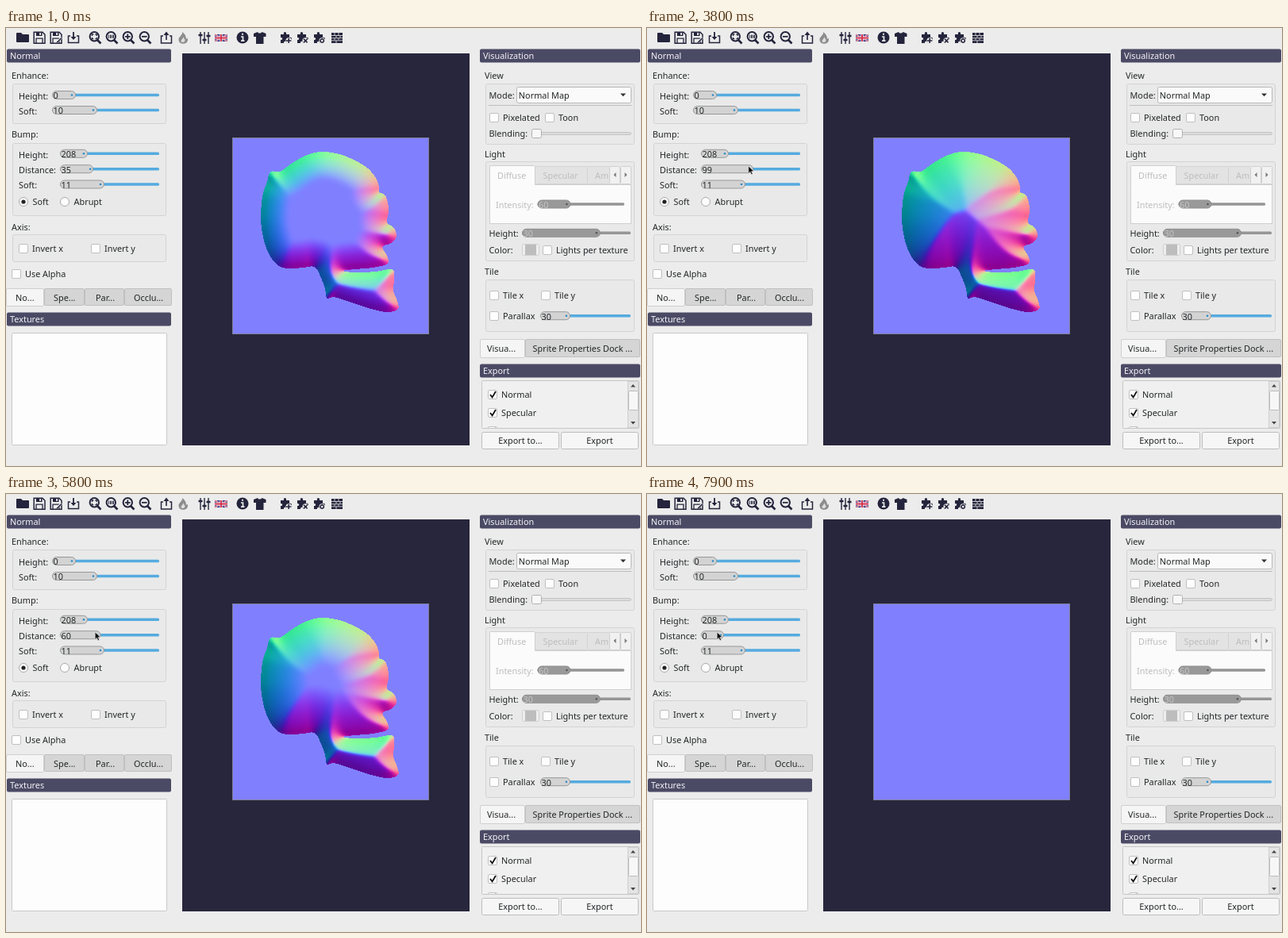
An HTML page with a canvas for the animation above (8000 ms loop, 800 by 552 pixels).

```html
<!DOCTYPE html>
<html lang="en">
<head>
<meta charset="utf-8">
<title>Normal map editor</title>
<style>
  html, body { margin: 0; width: 800px; height: 552px; overflow: hidden; background: #ececec; }
  svg, canvas { position: absolute; left: 0; top: 0; display: block; }
  canvas { left: 285px; top: 138px; }
  text { font: 10.88px "Noto Sans", "Open Sans", sans-serif; white-space: pre; }
</style>
</head>
<body>
<svg id="ui" width="800" height="552"></svg>
<canvas id="map" width="248" height="248"></canvas>
<svg id="top" width="800" height="552"></svg>
<script>
const start = performance.now();
const NS = "http://www.w3.org/2000/svg";
const ui = document.getElementById("ui");
const INK = "#232627", DARK = "#24243c", BLUE = "#55abdf", EDGE = "#c4c4c4", BAR = "#4b4a65";

function add(tag, attrs, parent = ui) {
  const el = document.createElementNS(NS, tag);
  for (const k in attrs) el.setAttribute(k, attrs[k]);
  return parent.appendChild(el);
}
function box(x, y, w, h, fill, stroke = "none", rx = 0, parent = ui) {
  const o = stroke === "none" ? 0 : 0.5;
  return add("rect", { x: x + o, y: y + o, width: w - 2 * o, height: h - 2 * o, rx, fill, stroke }, parent);
}
function label(x, y, s, fill = INK, anchor = "start", parent = ui) {
  const el = add("text", { x, y, fill, "text-anchor": anchor }, parent);
  el.textContent = s;
  return el;
}
const path = (d, fill = DARK, extra = {}, parent = ui) => add("path", { d, fill, ...extra }, parent);
const group = (x, y, w, h) => box(x, y, w, h, "#e9e9e9", "#d3d3d3", 2);
const tick = (x, y, parent) => path(`M${x + 3} ${y + 6}l2.6 3.4L${x + 10} ${y + 2}`, "none",
  { stroke: "#111", "stroke-width": 1.8 }, parent);

function header(x, y, w, s) {
  box(x, y - 0.5, w, 17, BAR, "none", 2);
  label(x + 4, y + 12, s, "#f4f4f8");
}
function check(x, y, s, on, parent = ui) {
  box(x, y, 12, 12, "#fdfdfd", "#c0c0c0", 1.5, parent);
  if (on) tick(x, y, parent);
  if (s) label(x + 17, y + 10, s, INK, "start", parent);
}
function radio(x, y, s, on) {
  add("circle", { cx: x, cy: y, r: 5.5, fill: "#fdfdfd", stroke: "#a9a9a9" });
  if (on) add("circle", { cx: x, cy: y, r: 2.6, fill: "#222" });
  label(x + 11.5, y + 4, s);
}
function slider(x, end, right, y, value, off) {
  box(x, y - 1.8, right - x, 3.6, off ? "#959595" : BLUE, "none", 1.5);
  const grip = box(x, y - 5.5, end - x, 11, off ? "#999" : "#d3d3d3", off ? "#8f8f8f" : "#989898", 5);
  const dot = add("circle", { cx: end - 5, cy: y, r: 1.3, fill: off ? "#555" : "#2b8bc6" });
  const text = label(x + 1.5, y + 4.8, value, off ? "#c4c4c4" : INK);
  return (v, edge) => {
    text.textContent = v;
    grip.setAttribute("width", edge - x - 1);
    dot.setAttribute("cx", edge - 4);
  };
}
function tabs(y, h, items) {
  items.forEach(([x, w, tx, s], i) => {
    box(x, y, w, h + (i ? 0 : 1), i ? "#d5d5d5" : "#f5f5f5", i ? "#c0c0c0" : "#cfcfcf", 1.5);
    label(tx, y + 15.5, s);
  });
}

function icon(x, draw) {
  const g = add("g", { transform: `translate(${x} 4)` });
  const fill = (d, c) => path(d, c, {}, g);
  const line = (d, w = 1.5, c = DARK) => path(d, "none", { stroke: c, "stroke-width": w }, g);
  draw(fill, line, g);
}
function toolbar() {
  const floppy = (f, l) => {
    l("M1.2 1.2H12L15 4.2V15.2H1.2Z", 1.5);
    f("M4 1H11.5V6H4Z");
    f("M8.2 2H10V5H8.2Z", "#ececec");
    l("M4 15V9.2H12V15", 1.3);
  };
  const lens = (f, l) => {
    l("M13 6.8A5.7 5.7 0 1 1 1.6 6.8A5.7 5.7 0 1 1 13 6.8Z", 2);
    l("M11 11L15.5 15.5", 2.6);
  };
  const puzzle = f => f("M1 4H5C3.8 0 9 0 8 4H12V8C16 7 16 12 12 11V15H8C8.6 12 4.6 12 5 15H1V11C4 11.5 4 7.5 1 8Z");
  const badge = (f, l, d) => {
    f("M15 12A3.8 3.8 0 1 1 7.4 12A3.8 3.8 0 1 1 15 12Z", "#ececec");
    l(d, 1.6);
  };
  icon(13, f => f("M0 3Q0 2 1 2H6L8 4H15Q16 4 16 5V13Q16 14 15 14H1Q0 14 0 13Z"));
  icon(34, floppy);
  icon(55, (f, l) => { floppy(f, l); l("M9 14L15 8", 3, "#ececec"); l("M9 14.5L15 8.5", 1.6); });
  icon(77, (f, l) => { l("M4 6H1.5V14.5H14.5V6H12"); l("M8 1V9", 1.8); f("M4.5 7H11.5L8 11Z"); });
  icon(104, (f, l) => { lens(f, l); l("M4.5 6V4H6.4M8.4 4H10.2V6M10.2 7.8V9.6H8.4M6.4 9.6H4.5V7.8", 1.3); });
  icon(125, (f, l) => { lens(f, l); l("M4.4 4.5V9M6.4 5H7.6V8.5H6.4ZM9.4 5H10.6V8.5H9.4Z", 0.9); });
  icon(146, (f, l) => { lens(f, l); l("M4 6.8H10.6M7.3 3.5V10.1", 1.8); });
  icon(167, (f, l) => { lens(f, l); l("M4 6.8H10.6", 1.8); });
  icon(194, (f, l) => { l("M4 6H1.5V15H14.5V6H12"); l("M8 3V11", 1.6); f("M4.5 5H11.5L8 0.5Z"); });
  icon(216, f => {
    f("M6 1C7 5 1 7 1.5 11C2 15 5 16 8 15.8C12 15.5 14 12 12.5 8.5L11 10C11 6 9 3 6 1Z", "#8c8c8c");
    f("M7 7C7.5 10 4 10.5 4.5 13C6 15 10 14 9.5 11Z", "#dedede");
  });
  icon(242, (f, l) => { l("M3 1V16M8 1V16M13 1V16", 1.4); l("M.5 5H5.5M5.5 11H10.5M10.5 6H15.5", 2.4); });
  icon(263, (f, l) => {
    f("M0 4H16V13H0Z", "#34327d");
    l("M0 4L16 13M16 4L0 13", 2, "#f3eef4");
    l("M0 4L16 13M16 4L0 13", 0.8, "#d3324f");
    l("M8 4V13M0 8.5H16", 3.4, "#f3eef4");
    l("M8 4V13M0 8.5H16", 1.9, "#d3324f");
  });
  icon(290, (f, l) => {
    f("M15.5 8A7.5 7.5 0 1 1 .5 8A7.5 7.5 0 1 1 15.5 8Z");
    l("M6 7H8.5V12M6 12.2H10.5", 1.7, "#ececec");
    l("M7 3.8H9", 2, "#ececec");
  });
  icon(312, f => f("M5 1C6 3 9 3 10.5 1L15.5 3V7L12.5 7V16H3V7L0 7V3Z"));
  icon(345, (f, l) => { puzzle(f); badge(f, l, "M8 12H14.4M11.2 9V15"); });
  icon(366, (f, l) => { puzzle(f); badge(f, l, "M9 9.8L13.6 14.4M13.6 9.8L9 14.4"); });
  icon(387, (f, l) => { puzzle(f); badge(f, l, "M13.4 12A2.2 2.2 0 1 1 9 12A2.2 2.2 0 1 1 13.4 12Z"); });
  icon(409, (f, l) => {
    f("M1 2H15V15H1Z");
    l("M1 5.5H15M1 8.7H15M1 11.8H15M5 2V5M10 2V5M7 6V8M12 6V8M5 9V11M10 9V11M7 12V15", 0.8, "#ececec");
  });
}

let setDistance;
function leftDock() {
  header(1, 27, 207, "Normal");
  label(7, 64, "Enhance:");
  group(8, 70, 194, 51);
  label(16, 90, "Height:");
  slider(58, 88, 193, 84.5, "0");
  label(16, 109, "Soft:");
  slider(58, 115, 193, 103.5, "10");
  label(7, 138, "Bump:");
  group(8, 145, 194, 92);
  label(16, 163.5, "Height:");
  slider(68, 103, 193, 158.3, "208");
  label(16, 183, "Distance:");
  setDistance = slider(68, 110, 193, 177.7, "35");
  label(16, 202, "Soft:");
  slider(68, 124, 193, 197, "11");
  radio(22, 219, "Soft", true);
  radio(74, 219, "Abrupt");
  label(7, 254.5, "Axis:");
  group(8, 260, 194, 35);
  check(16, 272, "Invert x");
  check(107, 272, "Invert y");
  check(7, 304, "Use Alpha");
  tabs(328, 22, [[0, 48, 12, "No..."], [48, 51, 60, "Spe..."], [99, 50, 113, "Par..."], [149, 60, 161, "Occlu..."]]);
  header(1, 359, 207, "Textures");
  box(7, 384, 196, 142, "#fdfdfd", "#c9c9c9", 1);
}

function rightDock() {
  const faint = "#bdbdbd";
  header(597, 27, 202, "Visualization");
  label(603, 64, "View");
  group(604, 70, 188, 77);
  label(608.5, 88.5, "Mode:");
  box(643, 74, 145, 21, "#fafafa", "#b8b8b8", 2);
  label(645.8, 88.5, "Normal Map");
  path("M774 82.5H781L777.5 86.3Z", "#333");
  box(608, 97, 180, 1, "#bdbdbd");
  check(609, 107, "Pixelated");
  check(679, 107, "Toon");
  label(608.5, 137, "Blending:");
  box(663, 131, 125, 4, "#dcdcdc", EDGE, 2);
  box(662, 127, 13, 12, "#f8f8f8", "#b0b0b0", 2);
  label(603, 163, "Light");
  group(604, 168, 188, 126);
  box(609, 197, 179, 50, "#fbfbfb", "#cfcfcf");
  box(666, 174, 67, 23, "#e3e3e3", "#d3d3d3", 1);
  box(732, 174, 29, 23, "#e3e3e3", "#d3d3d3", 1);
  box(609, 173, 58, 25, "#fbfbfb", "#cfcfcf", 1);
  box(610, 196, 56, 3, "#fbfbfb");
  label(619, 189.5, "Diffuse", faint);
  label(676.5, 189.5, "Specular", faint);
  label(742, 189.5, "Am", faint);
  box(760, 174, 14, 23, "#f1f1f1", "#d0d0d0", 1);
  box(774, 174, 14, 23, "#f1f1f1", "#d0d0d0", 1);
  path("M768.5 182V188L765.5 185ZM779.5 182V188L782.5 185Z", "#777");
  label(617, 226.5, "Intensity:", faint);
  slider(669.5, 711.5, 779, 222, "60", true);
  label(608.5, 263, "Height:");
  slider(650, 749, 787, 258.3, "30", true);
  label(608.5, 284, "Color:");
  box(650, 272, 22, 15, "#eeeeee", "#cfcfcf", 2);
  box(654, 273, 14, 13, "#bdbdbd");
  check(676, 274, "Lights per texture");
  label(603, 311, "Tile");
  group(604, 317, 188, 66);
  check(609, 331, "Tile x");
  check(674, 331, "Tile y");
  check(609, 357, "Parallax");
  slider(673, 711, 787, 362.7, "30");
  tabs(392, 23, [[597, 57, 606, "Visua..."], [654, 145, 663.5, "Sprite Properties Dock ..."]]);

  header(597, 424, 202, "Export");
  box(599, 444, 199, 61, "#f0f0f0", "#c6c6c6", 1);
  const clip = add("clipPath", { id: "list" });
  box(600, 445, 183, 59, "#000", "none", 0, clip);
  const list = add("g", { "clip-path": "url(#list)" });
  check(607, 456, "Normal", true, list);
  check(607, 479, "Specular", true, list);
  check(607, 502, "", true, list);
  box(783, 445, 14, 59, "#e4e4e4", "#d0d0d0");
  box(784, 457, 13, 25, "#f7f7f7", "#bcbcbc", 1);
  path("M787 452.5H793L790 449ZM787 496H793L790 499.5Z", "#444");
  box(599, 509, 98, 22, "#f6f6f6", "#bdbdbd", 2);
  box(699, 509, 98, 22, "#f6f6f6", "#bdbdbd", 2);
  label(648, 524, "Export to...", INK, "middle");
  label(748, 524, "Export", INK, "middle");
}

// Skull outline as x,y pairs, rounded into a closed spline.
const N = 248;
const outline = [333,181, 345,181, 361,170, 379,160, 398,156, 420,159, 440,167, 456,177, 466,189,
  470,200, 470,207, 477,210, 481,220, 482,232, 480,241, 481,247, 488,251, 492,260, 490,267, 483,272,
  474,276, 480,287, 481,297, 462,302, 440,304, 424,306, 440,308, 466,307, 487,304, 489,318, 488,331,
  494,347, 493,355, 480,358, 460,354, 432,345, 413,339, 404,341, 402,328, 396,313, 389,301, 375,302,
  356,303, 344,300, 333,288, 325,268, 321,242, 323,212, 329,194];

function spline(flat, steps) {
  const n = flat.length / 2, out = [];
  const at = (i, k) => flat[((i + n) % n) * 2 + k];
  const mix = (i, u, k) => {
    const a = at(i - 1, k), b = at(i, k), c = at(i + 1, k), d = at(i + 2, k);
    return b + 0.5 * u * (c - a + u * (2 * a - 5 * b + 4 * c - d + u * (3 * (b - c) + d - a)));
  };
  for (let i = 0; i < n; i++)
    for (let s = 0; s < steps; s++) out.push([mix(i, s / steps, 0) - 285, mix(i, s / steps, 1) - 138]);
  return out;
}

// Distance to the outline inside the shape, zero outside.
function distanceField() {
  const pts = spline(outline, 3);
  const segs = pts.map(([x, y], i) => {
    const [u, v] = pts[(i + 1) % pts.length];
    return { x, y, dx: u - x, dy: v - y, len: (u - x) ** 2 + (v - y) ** 2 || 1e-6 };
  });
  const field = new Float32Array(N * N);
  for (let j = 0; j < N; j++) for (let i = 0; i < N; i++) {
    const px = i + 0.5, py = j + 0.5;
    let best = 1e9, inside = false;
    for (const s of segs) {
      const ax = px - s.x, ay = py - s.y;
      let u = (ax * s.dx + ay * s.dy) / s.len;
      u = u < 0 ? 0 : u > 1 ? 1 : u;
      const ex = ax - u * s.dx, ey = ay - u * s.dy, q = ex * ex + ey * ey;
      if (q < best) best = q;
      if (s.y > py !== s.y + s.dy > py && px < s.x + (py - s.y) / s.dy * s.dx) inside = !inside;
    }
    field[j * N + i] = inside ? Math.sqrt(best) : 0;
  }
  return field;
}

function blur(src, step, across, r) {
  const out = new Float32Array(N * N);
  for (let line = 0; line < N; line++) {
    const o = line * across;
    const get = k => src[o + Math.min(N - 1, Math.max(0, k)) * step];
    let sum = 0;
    for (let k = -r; k <= r; k++) sum += get(k);
    for (let k = 0; k < N; k++) {
      out[o + k * step] = sum / (2 * r + 1);
      sum += get(k + r + 1) - get(k - r);
    }
  }
  return out;
}

const field = distanceField();
const ctx = document.getElementById("map").getContext("2d");
const image = ctx.createImageData(N, N);

// Round bevel of the given reach, softened, then turned into normals.
function drawMap(reach) {
  const bump = 1.75;
  let h = field.map(d => {
    const rest = reach - Math.min(d, reach);
    return bump * Math.sqrt(reach * reach - rest * rest);
  });
  for (let pass = 0; pass < 2; pass++) h = blur(blur(h, 1, N, 3), N, 1, 3);
  for (let p = 0; p < N * N; p++) {
    let nx = 0, ny = 0;
    if (field[p] > 0) {
      nx = (h[p - 1] - h[p + 1]) / 2;
      ny = (h[p + N] - h[p - N]) / 2;
    }
    const m = 127.5 / Math.hypot(nx, ny, 1);
    image.data.set([127.5 + nx * m, 127.5 + ny * m, 127.5 + m, 255], p * 4);
  }
  ctx.putImageData(image, 0, 0);
}

toolbar();
leftDock();
box(222, 32, 362, 494, "#28263c");
rightDock();
const overlay = document.getElementById("top");
box(285, 138, 248, 248, "none", "#7f7f98", 0, overlay);
const cursor = path("M0 0V9.2L2.2 7.3L3.8 10.8L5.4 10L3.8 6.7L6.7 6.4Z", "#0b0b0b",
  { stroke: "#f4f4f4", "stroke-width": 0.6 }, overlay);

// Keys are [ms, value, ...]; values between keys are linear.
const reachKeys = [[2200, 35], [2500, 37], [2800, 43], [3300, 70], [3800, 99], [4000, 104], [4400, 107],
  [4800, 103], [5200, 91], [5800, 60], [6300, 36], [6700, 20], [7400, 0]];
const entryKeys = [[1100, 782, 408], [1200, 566, 286], [1300, 566, 286], [1800, 180, 196], [2200, 102.5, 174]];

function sample(keys, t) {
  if (t <= keys[0][0]) return keys[0].slice(1);
  const i = keys.findIndex(k => k[0] >= t);
  if (i < 0) return keys[keys.length - 1].slice(1);
  const a = keys[i - 1], b = keys[i], u = (t - a[0]) / (b[0] - a[0]);
  return a.slice(1).map((v, k) => v + (b[k + 1] - v) * u);
}

let shown = -1;
function render(ms) {
  const t = Math.floor(ms % 8000 / 100) * 100;
  const reach = Math.round(sample(reachKeys, t)[0]);
  if (reach !== shown) {
    drawMap(reach);
    setDistance(reach, 97 + 0.375 * reach);
    shown = reach;
  }
  const [x, y] = t < 2200 ? sample(entryKeys, t) : [88.2 + 0.4 * reach, 174];
  cursor.setAttribute("transform", `translate(${x} ${y})`);
  cursor.setAttribute("visibility", t < 1100 ? "hidden" : "visible");
}
function loop() {
  render(performance.now() - start);
  requestAnimationFrame(loop);
}
loop();
</script>
</body>
</html>
```
